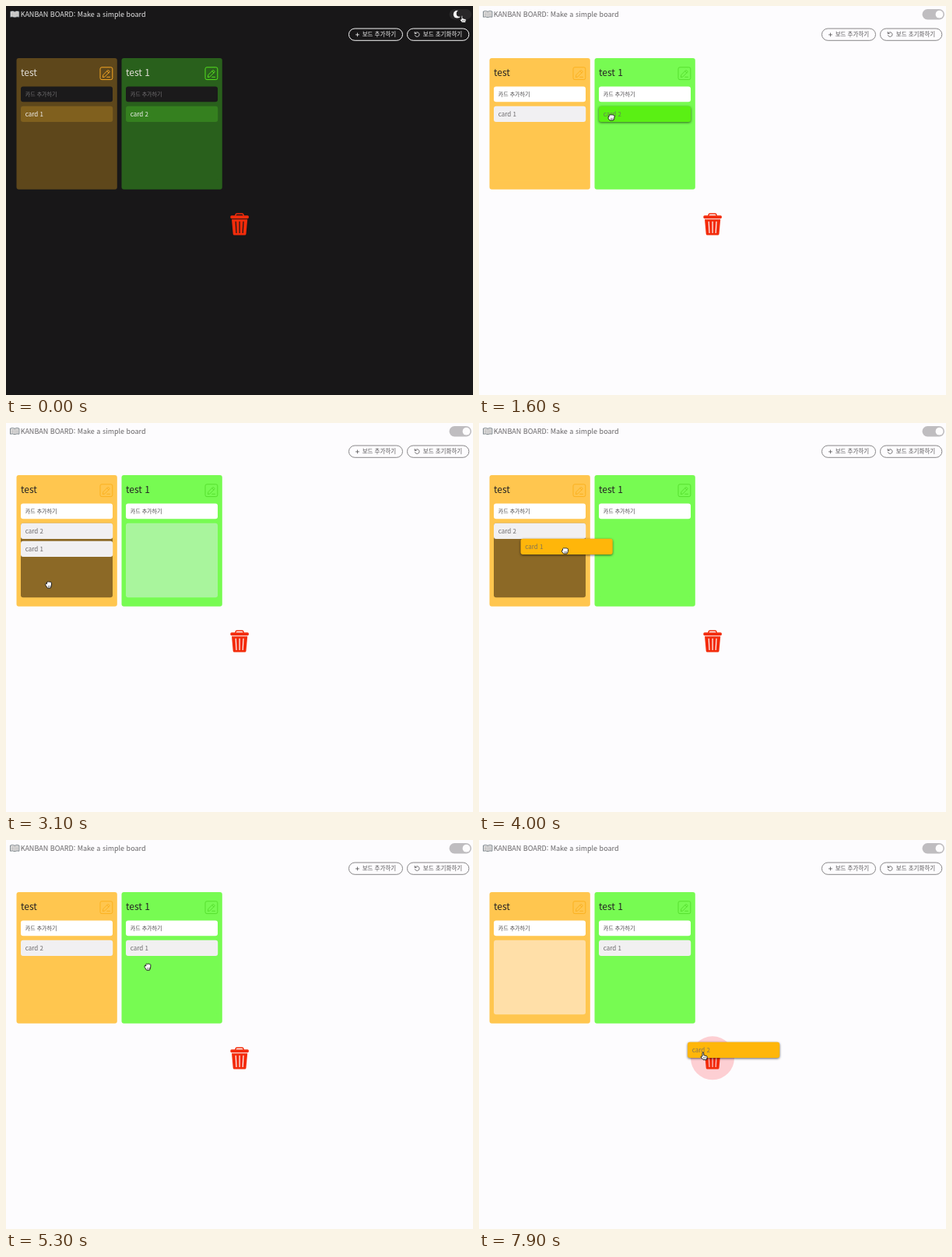
Animation of 600x500 px, one loop 8 s. Source, as an HTML page:

```html
<!DOCTYPE html>
<html lang="ko">
<head>
<meta charset="utf-8">
<title>Kanban board</title>
<style>
html, body { margin: 0; width: 100%; height: 100%; overflow: hidden; }
svg { display: block; width: 600px; height: 500px; font-family: "Noto Sans CJK KR", "Noto Sans CJK JP", sans-serif; }
text { white-space: pre; }
</style>
</head>
<body>
<svg id="stage" viewBox="0 0 600 500"></svg>
<script>
const LOOP = 8000, STEP = 100;
const stage = document.getElementById('stage');

const rgb = hex => [1, 3, 5].map(i => parseInt(hex.slice(i, i + 2), 16));
const mix = (a, b, k) => {
  const p = rgb(a), q = rgb(b);
  return '#' + p.map((v, i) => Math.round(v + (q[i] - v) * k).toString(16).padStart(2, '0')).join('');
};

// Finds the surrounding keys and the fraction between them.
function between(keys, t) {
  const next = keys.findIndex(key => key[0] > t);
  if (next === 0) return [keys[0], keys[0], 0];
  if (next < 0) { const last = keys[keys.length - 1]; return [last, last, 0]; }
  const a = keys[next - 1], b = keys[next];
  return [a, b, (t - a[0]) / (b[0] - a[0])];
}
const num = (keys, t, i = 1) => {
  const [a, b, k] = between(keys, t);
  return a[i] + (b[i] - a[i]) * k;
};
const point = (keys, t) => [num(keys, t), num(keys, t, 2)];
const within = (t, spans) => spans.some(([a, b]) => t >= a && t < b);

const rect = (x, y, w, h, r, fill, more = '') =>
  `<rect x="${x}" y="${y}" width="${w}" height="${h}" rx="${r}" fill="${fill}" ${more}/>`;
const text = (x, y, size, fill, str, weight = 400) =>
  `<text x="${x}" y="${y}" font-size="${size}" fill="${fill}" font-weight="${weight}">${str}</text>`;
const line = (d, stroke, width = 1) =>
  `<path d="${d}" fill="none" stroke="${stroke}" stroke-width="${width}" stroke-linecap="round" stroke-linejoin="round"/>`;
const at = ([x, y], body) => `<g transform="translate(${x} ${y})">${body}</g>`;

// Colours are pairs: dark theme, light theme.
const boards = [
  { x: 13.5, title: 'test', bg: ['#5e471b', '#ffc64f'], card: ['#80601e', '#f1f0f2'], icon: ['#f5a623', '#fbb11f'],
    over: '#8c6926', from: '#ffdfa8',
    list: [[2200, 'bg'], [2400, 'over'], [3100, 'over'], [3300, 'bg'], [3800, 'bg'], [4000, 'over'], [4200, 'over'],
      [4400, 'from'], [5000, 'from'], [5200, 'bg'], [6700, 'bg'], [6900, 'over'], [7100, 'over'], [7300, 'from']] },
  { x: 148.5, title: 'test 1', bg: ['#29601c', '#77fb52'], card: ['#35801f', '#f1f0f1'], icon: ['#55e01e', '#57e02f'],
    over: '#3a7d28', from: '#a9f59d',
    list: [[1600, 'bg'], [1800, 'over'], [2100, 'over'], [2300, 'from'], [3100, 'from'], [3300, 'bg'],
      [4200, 'bg'], [4400, 'over'], [5000, 'over'], [5200, 'bg']] }
];

const cards = [
  { label: 'card 1', home: t => t < 5000 ? 0 : 1, drags: [[3800, 5000, '#ffb60a']],
    path: [[2200, 19, 129], [2500, 19, 152], [3800, 19, 152], [4200, 88, 146], [4500, 160, 140], [4700, 162, 138], [5000, 154, 129]] },
  { label: 'card 2', home: t => t < 3100 ? 1 : 0, drags: [[1600, 3100, '#5af014'], [6700, 8000, '#ffb60a']],
    path: [[1600, 154, 129], [1900, 135, 124], [2200, 82, 117], [2700, 21, 131], [3100, 19, 129],
      [6700, 19, 129], [7000, 80, 158], [7600, 272, 242], [7900, 268, 260]] }
];

const cursorPath = [[900, 587, 17], [1400, 190, 140], [1600, 170, 143], [1900, 151, 138], [2200, 98, 131], [2700, 37, 145],
  [3100, 55, 208], [3600, 76, 167], [3800, 76, 167], [4200, 145, 161], [4500, 217, 155], [4700, 219, 153],
  [5100, 210, 168], [6400, 30, 136], [6700, 30, 136], [7000, 98, 172], [7600, 293, 259], [7900, 289, 278]];
const hands = {
  point: 'M-2 0V-4a.9.9 0 0 1 1.8 0V-1.3L3.3-.4q1.1.3.9 1.6L3.4 4.5H-1L-4 1q0-1.4 1.3-.8z',
  open: 'M-4.2-1.4q.9-.9 1.7.3V-3.4q.8-1.2 1.5 0 .6-1.5 1.5-.3 1-1 1.5.4 1.2-.6 1.5.6V0Q3.2 2.4 2.2 4.2H-1.7L-4.2.3z',
  closed: 'M-3-2.3q1-1.6 2-.6 1-1 2 0 1-.7 1.8.2 1.2-.2 1.2 1.2Q4.3 2 2.6 4H-2Q-4.5 1.5-4 0q.2-.7 1-.5z'
};

function drawHeader(pick, t) {
  const fg = pick(['#e6e6e6', '#666466']);
  const ink = mix('#f6f6f6', '#555355', num([[600, 0], [900, 1]], t));
  const edge = mix('#f6f6f6', '#888688', num([[600, 0], [900, 1]], t));
  const knob = num([[600, 579.7], [900, 591.5]], t);
  const shade = num([[500, 3], [600, 2], [900, 9]], t);
  const pill = pick(['#282728', '#bfbdc0']);
  const shadeFill = t < 700 ? (t < 600 ? pill : '#0b0a0b') : pill;
  const book = pick(['#e4e4e4', '#f0eeee']);
  return `<path d="M5.5 7q3-1.3 5.7.2 2.700-1.500 5.700-.2v7.200q-3-.8-5.700.5-2.700-1.300-5.700-.5z" fill="${book}" stroke="#4c5a60" stroke-width=".7"/>`
    + line('M11.200 7.300v7M7 8.700h2.700M7 10.500h2.700M7 12.300h2.700M12.700 8.700h2.700M12.700 10.500h2.700M12.700 12.300h2.700', '#888', .6)
    + text(18.7, 14.2, 9, fg, 'KANBAN BOARD: Make a simple board', 500)
    + rect(569.5, 4, 28.5, 13.5, 6.75, pill)
    + `<circle cx="${knob}" cy="10.700" r="4.900" fill="#fdfcfd"/>`
    + (t < 900 ? `<circle cx="${knob + shade}" cy="9.700" r="4" fill="${shadeFill}"/>` : '')
    + rect(440.5, 29, 69, 15.3, 7.65, 'none', `stroke="${edge}"`)
    + rect(515.5, 29, 79.3, 15.3, 7.65, 'none', `stroke="${edge}"`)
    + line('M449.500 36.900h4M451.500 34.900v4', ink, .8)
    + text(457.7, 39.4, 7.5, ink, '보드 추가하기')
    + line('M525.600 35.200a2.900 2.900 0 1 1-.2 2.400M525.200 33.400v2h2', ink, .8)
    + text(535.8, 39.4, 7.5, ink, '보드 초기화하기');
}

function drawBoard(b, pick, t) {
  const bg = pick(b.bg), icon = pick(b.icon);
  const tone = name => name === 'bg' ? bg : b[name];
  const [from, to, k] = between(b.list, t);
  const x = b.x;
  return rect(x, 67, 129.3, 168.8, 3, bg)
    + text(x + 5.5, 89.6, 12, pick(['#e4e0da', '#242224']), b.title, 500)
    + rect(x + 107.5, 78.8, 15.8, 15.8, 2, 'none', `stroke="${icon}"`)
    + at([x + 115.4, 86.7], line('M-4.500 4.600l.5-2.800L2.200-4.400l2.200 2.200L-1.800 4zM.8-3L3-.8M.8 4.600H4.600', icon, 1))
    + rect(x + 5.5, 103.5, 118, 19.8, 3, pick(['#1b1a1b', '#ffffff']))
    + text(x + 11.3, 115.8, 7, pick(['#757375', '#454345']), '카드 추가하기')
    + rect(x + 5.5, 128.7, 118, 95.5, 3, mix(tone(from[1]), tone(to[1]), k));
}

function drawCard(c, pick, t) {
  const drag = c.drags.find(([a, b]) => t >= a && t < b);
  const fill = drag ? drag[2] : pick(boards[c.home(t)].card);
  const ink = drag ? mix('#656365', drag[2], .2) : pick(['#f2f2f2', '#6b696b']);
  return at(point(c.path, t),
    rect(0, -.2, 118.2, 20.3, 3, fill, drag ? 'style="filter:drop-shadow(0 1px 1.5px #0009)"' : '')
    + text(5.7, 13, 8, ink, c.label));
}

function drawTrash(bg, t) {
  const glow = num([[7600, 0], [7800, 1]], t);
  return `<circle cx="300" cy="280.300" r="28" fill="#fdcfd3" opacity="${glow}"/>`
    + line('M294.800 269.500q.2-2.500 2-2.500h6.400q1.800 0 2 2.500', '#f32c0b', 1.4)
    + rect(288.3, 269.2, 23.6, 4, 1.6, '#f32c0b')
    + '<path d="M290 274.300h20.200l-1.700 18.800q-.2 1.500-1.600 1.500h-13.600q-1.400 0-1.600-1.500z" fill="#f32c0b"/>'
    + line('M295.200 277.300l.8 14.200M300.100 277.300v14.200M305 277.300l-.8 14.200', glow > 0 ? mix(bg, '#fdcfd3', glow) : bg, 1.2);
}

function drawCursor(t) {
  const held = within(t, [[1600, 2800], [3800, 4800], [6700, 7800]]);
  const shape = held ? 'closed' : within(t, [[0, 1400], [7800, 8000]]) ? 'point' : 'open';
  return at(point(cursorPath, t), `<path d="${hands[shape]}" fill="#fff" stroke="#111" stroke-width=".9" stroke-linejoin="round"/>`
    + line('M-.6 1.200v1.800M.8 1.200v1.800M2.200 1.200v1.800', '#333', .5));
}

function scene(t) {
  const theme = num([[400, 0], [500, .35], [600, 1]], t);
  const pick = pair => mix(pair[0], pair[1], theme);
  const bg = pick(['#181718', '#fdfcfe']);
  const held = c => c.drags.some(([a, b]) => t >= a && t < b);
  const order = [...cards].sort((a, b) => held(a) - held(b));
  return rect(0, 0, 600, 500, 0, bg)
    + drawHeader(pick, t)
    + boards.map(b => drawBoard(b, pick, t)).join('')
    + drawTrash(bg, t)
    + order.map(c => drawCard(c, pick, t)).join('')
    + drawCursor(t);
}

let shown = -1;
function tick() {
  const t = Math.floor(performance.now() % LOOP / STEP) * STEP;
  if (t !== shown) stage.innerHTML = scene(shown = t);
  requestAnimationFrame(tick);
}
tick();
</script>
</body>
</html>
```
